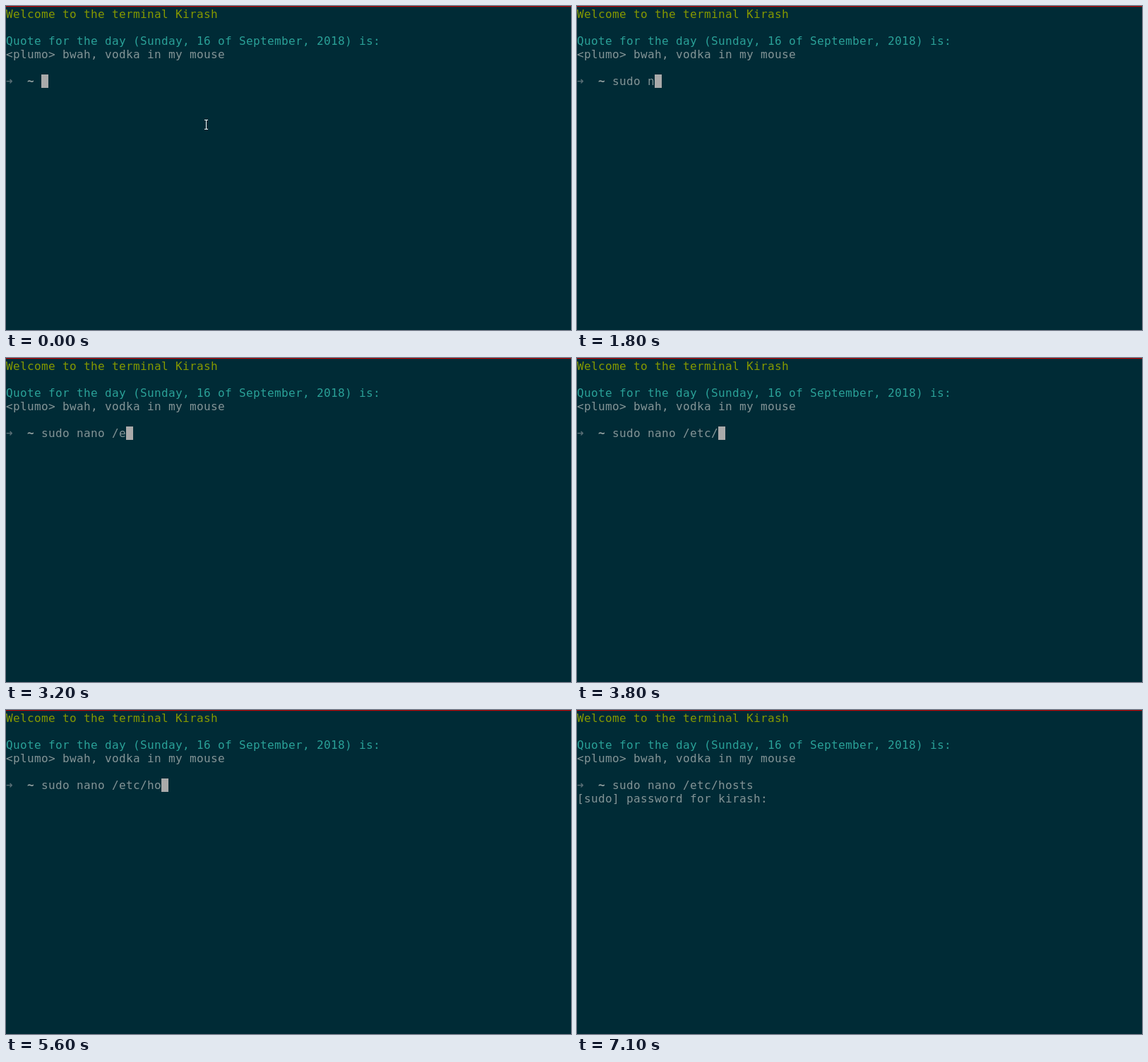
Animation of 800x459 px, one loop 8000 ms. Source, as an HTML page:

```html
<!DOCTYPE html>
<html lang="en">
<head>
<meta charset="utf-8">
<title>Terminal</title>
<style>
  html, body { margin: 0; width: 100%; height: 100%; overflow: hidden; background: #002b36; }
  #stage { position: relative; width: 800px; height: 459px; overflow: hidden; }
  #stage::before { content: ""; position: absolute; width: 100%; height: 1px; background: #c00; }
  /* Each cell of the terminal grid is 10 by 19 pixels. */
  .text {
    position: absolute;
    left: calc(var(--col) * 10px);
    top: calc(2px + var(--row) * 19px);
    font: 16px/19px "DejaVu Sans Mono", monospace;
    letter-spacing: calc(10px - 1ch);
    white-space: pre;
    color: #839496;
  }
  .green { color: #859900; }
  .cyan { color: #2aa198; }
  .arrow { color: #586e75; font-weight: bold; }
  .path { color: #93a1a1; font-weight: bold; }
  #cursor { width: 10px; height: 19px; background: #aaa; }
  #pointer { position: absolute; left: 281px; top: 161px; }
</style>
</head>
<body>
<div id="stage">
  <div class="text green" style="--col:0;--row:0">Welcome to the terminal Kirash</div>
  <div class="text cyan" style="--col:0;--row:2">Quote for the day (Sunday, 16 of September, 2018) is:</div>
  <div class="text" style="--col:0;--row:3">&lt;plumo&gt; bwah, vodka in my mouse</div>
  <div class="text arrow" style="--col:0;--row:5">➜</div>
  <div class="text path" style="--col:3;--row:5">~</div>
  <div class="text" id="command" style="--col:5;--row:5"></div>
  <div class="text" id="password" style="--col:0;--row:6">[sudo] password for kirash: </div>
  <div class="text" id="cursor"></div>
  <svg id="pointer" width="5" height="14" shape-rendering="crispEdges">
    <path d="M0 .5H5M2.5 0V14M0 13.5H5" fill="none" stroke="#fff"/>
  </svg>
</div>
<script>
const LOOP = 8000, POINTER_HIDES = 1100, ENTER = 6500;
const COMMAND = "sudo nano /etc/hosts";
const PROMPT_COL = 5, PROMPT_ROW = 5;

// The time at which each character of the command appears.
const KEY_TIMES = [
  1100, 1200, 1400, 1500, 1700,
  1800, 2000, 2000, 2100, 2600,
  2800, 3200, 3400, 3600, 3800,
  5400, 5600, 5700, 5800, 5900
];
// Spans in which the blinking cursor is off.
const CURSOR_OFF = [[600, 1100], [4400, 5000], [7100, LOOP]];

const [command, password, cursor, pointer] =
  ["command", "password", "cursor", "pointer"].map(id => document.getElementById(id));

const show = (element, visible) => {
  element.style.visibility = visible ? "visible" : "hidden";
};

function render(time) {
  const typed = KEY_TIMES.filter(key => key <= time).length;
  const entered = time >= ENTER;

  command.textContent = COMMAND.slice(0, typed);
  cursor.style.setProperty("--col", entered ? password.textContent.length : PROMPT_COL + typed);
  cursor.style.setProperty("--row", entered ? PROMPT_ROW + 1 : PROMPT_ROW);

  show(password, entered);
  show(pointer, time < POINTER_HIDES);
  show(cursor, !CURSOR_OFF.some(([from, to]) => time >= from && time < to));
}

const start = performance.now();
function tick() {
  render((performance.now() - start) % LOOP);
  requestAnimationFrame(tick);
}
tick();
</script>
</body>
</html>
```
